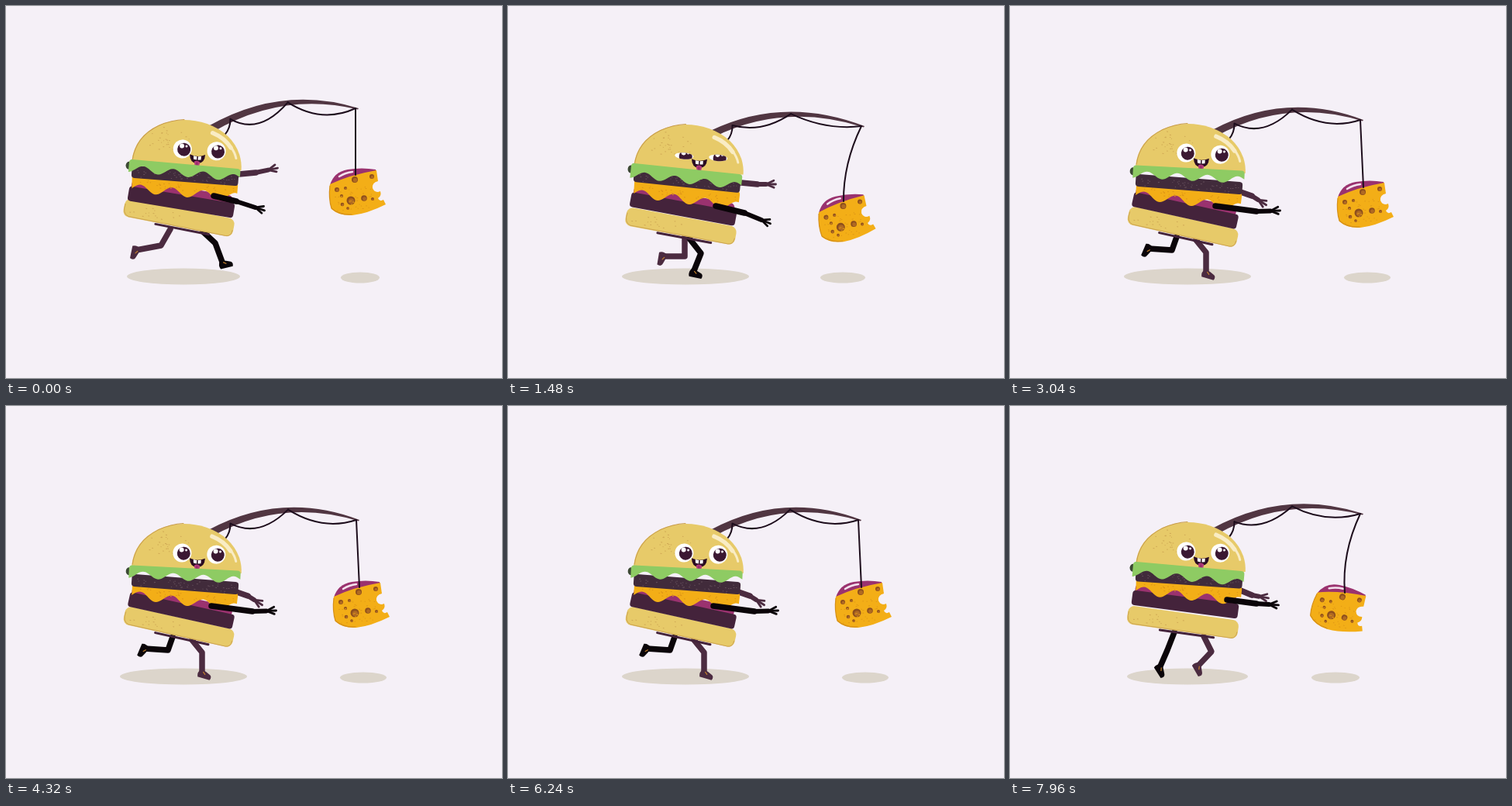
An HTML page with a canvas for the animation above (8 s loop, 640x480 px).

```html
<!DOCTYPE html>
<html lang="en">
<head>
<meta charset="utf-8">
<title>Running burger</title>
<style>
html, body { margin: 0; width: 100%; height: 100%; overflow: hidden; background: #f5f0f7; }
canvas { display: block; width: 640px; height: 480px; }
</style>
</head>
<body>
<canvas id="stage" width="640" height="480"></canvas>
<script>
const ctx = document.getElementById('stage').getContext('2d');
const LOOP = 8000, RUN = 640, STEP = 320, TICK = 40;
const BUN = '#e7ca69', PLUM = '#44233b', LIMB = '#4b2b40', BLACK = '#0b0509',
      TAN = '#c89c4c', LINE = '#1d0d1c', BERRY = '#9a326f', GOLD = '#f3ae17';

// time, then bun y/angle, lettuce y/angle/depth, patty, sauce, lower patty, base bun, shadow
const bodyKeys = [
  [0,   204, 5,   204, 5, 12,  219, 4.5, 231, 5,  253, 9.5,  273, 11,   73],
  [160, 209, 4,   209, 3, 12,  230, 4.5, 242, 7,  264, 12.5, 285, 12.5, 82],
  [200, 210, 4.5, 210, 6, 15,  226, 6,   240, 7,  262, 10.5, 284, 10.5, 82],
  [280, 207, 4,   207, 5, 15,  223, 4,   235, 6,  256, 7.5,  279, 8,    78]
];
// time, hip, knee, ankle, toe offset
const legKeys = [
  [0,   254, 291, 270, 306, 280, 333, 11, -2],
  [80,  250, 297, 265, 313, 269, 340, 11, 3],
  [160, 240, 302, 253, 318, 253, 345, 11, 4],
  [200, 234, 300, 249, 319, 239, 344, 11, 3],
  [280, 212, 292, 203, 315, 193, 338, 5, 9],
  [320, 212, 288, 200, 309, 168, 315, -3, 11],
  [480, 215, 298, 209, 315, 179, 313, -5, 10],
  [520, 228, 298, 228, 323, 200, 323, -3, 13],
  [600, 250, 297, 260, 317, 242, 336, 5, 10]
];
// time, shoulder, elbow, fingertips
const nearArmKeys = [
  [0,   268, 245, 297, 252, 334, 264],
  [200, 268, 258, 305, 267, 339, 281],
  [280, 280, 250, 318, 255, 347, 257],
  [340, 278, 240, 318, 247, 350, 250],
  [480, 265, 258, 318, 265, 349, 264]
];
const farArmKeys = [
  [0,   290, 218, 322, 215, 351, 209],
  [120, 290, 225, 322, 223, 350, 221],
  [200, 290, 227, 322, 230, 346, 230],
  [280, 288, 234, 312, 244, 334, 248],
  [340, 286, 228, 310, 236, 333, 240],
  [480, 286, 236, 312, 245, 331, 257]
];
// time, tip x/y, bend y, string sag
const rodKeys = [
  [0,   454, 132, 104, 16],
  [60,  454, 131, 103, 15],
  [200, 459, 155, 118, 9],
  [280, 455, 139, 109, 12],
  [370, 453, 116, 83, 16],
  [480, 455, 147, 112, 14],
  [560, 456, 148, 114, 12]
];
// time, x, y, angle, string bow, shadow x/radius
const baitKeys = [
  [0,   451, 218, 0,  0,   457, 25],
  [100, 446, 234, -4, -5,  448, 27],
  [200, 433, 252, -4, -12, 432, 29],
  [280, 432, 241, 21, -14, 420, 31],
  [380, 459, 212, -7, 4,   446, 28],
  [420, 463, 215, -7, 4,   457, 28],
  [480, 456, 234, 0,  0,   461, 30],
  [560, 450, 238, 2,  0,   459, 29]
];

// Smooth periodic curve through the keys
function pose(keys, time, period) {
  const t = time % period, n = keys.length;
  const at = i => {
    const turn = Math.floor(i / n), k = keys[i - turn * n];
    return { t: k[0] + turn * period, v: k };
  };
  let i = n - 1;
  while (keys[i][0] > t) i--;
  const [a, b, c, d] = [at(i - 1), at(i), at(i + 1), at(i + 2)];
  const span = c.t - b.t, u = (t - b.t) / span, w = 1 - u;
  return b.v.slice(1).map((_, j) => {
    const k = j + 1;
    const m0 = (c.v[k] - a.v[k]) / (c.t - a.t) * span;
    const m1 = (d.v[k] - b.v[k]) / (d.t - b.t) * span;
    return w * w * (1 + 2 * u) * b.v[k] + u * w * w * m0 +
           u * u * (3 - 2 * u) * c.v[k] - u * u * w * m1;
  });
}

function place(x, y, degrees, draw) {
  ctx.save();
  ctx.translate(x, y);
  ctx.rotate(degrees * Math.PI / 180);
  draw();
  ctx.restore();
}
function fill(path, color) {
  ctx.fillStyle = color;
  ctx.fill(new Path2D(path));
}
function stroke(path, color, width) {
  ctx.strokeStyle = color;
  ctx.lineWidth = width;
  ctx.lineCap = ctx.lineJoin = 'round';
  ctx.stroke(new Path2D(path));
}
function oval(x, y, rx, ry, color) {
  ctx.fillStyle = color;
  ctx.beginPath();
  ctx.ellipse(x, y, rx, ry, 0, 0, 7);
  ctx.fill();
}
function slab(halfWidth, halfHeight, radius, color) {
  ctx.fillStyle = color;
  ctx.beginPath();
  ctx.roundRect(-halfWidth, -halfHeight, halfWidth * 2, halfHeight * 2, radius);
  ctx.fill();
}
const noise = n => { const s = Math.sin(n * 127.1) * 43758.5; return s - Math.floor(s); };
function speckle(count, x, y, w, h, color, seed) {
  ctx.fillStyle = color;
  for (let i = 0; i < count; i++) {
    const n = seed + i * 3;
    ctx.fillRect(x + noise(n) * w, y + noise(n + 1) * h, 1 + noise(n + 2), 1);
  }
}
// Slab whose lower edge hangs in lobes
function drip(left, right, top, depth, swing, period, lobe, color) {
  ctx.fillStyle = color;
  ctx.beginPath();
  ctx.moveTo(left, top + 4);
  ctx.quadraticCurveTo(left, top, left + 4, top);
  ctx.lineTo(right - 4, top);
  ctx.quadraticCurveTo(right, top, right, top + 4);
  for (let x = right; x >= left; x -= 2)
    ctx.lineTo(x, depth + swing * Math.cos((x - lobe) / period * 2 * Math.PI));
  ctx.fill();
}

function leg(time, color) {
  const [hx, hy, kx, ky, ax, ay, tx, ty] = pose(legKeys, time, RUN);
  stroke(`M${hx} ${hy}L${kx} ${ky}L${ax} ${ay}`, color, 7.5);
  const angle = Math.atan2(ty, tx) * 180 / Math.PI;
  place(ax, ay, angle, () => {
    fill('M-3 -5Q4 -4 9 -2Q14 -1 12 5L-4 6Q-7 1 -3 -5Z', color);
    stroke('M1 -2L4 0', '#c4812b', 1.2);
  });
}

function arm(keys, time, color) {
  const [sx, sy, ex, ey, hx, hy] = pose(keys, time, RUN);
  const a = Math.atan2(hy - ey, hx - ex);
  const wx = hx - 13 * Math.cos(a), wy = hy - 13 * Math.sin(a);
  stroke(`M${sx} ${sy}L${ex} ${ey}`, color, 7.5);
  stroke(`M${ex} ${ey}L${wx} ${wy}`, color, 6);
  for (const spread of [-0.45, 0, 0.4]) {
    const r = spread ? 11 : 12.5;
    stroke(`M${wx} ${wy}L${wx + r * Math.cos(a + spread)} ${wy + r * Math.sin(a + spread)}`, color, 2.8);
  }
}

function rod(time, bunY) {
  const [tx, ty, bend, sag] = pose(rodKeys, time, RUN);
  const bx = 266, by = bunY - 48, cx = 356;
  const on = u => [
    (1 - u) ** 2 * bx + 2 * u * (1 - u) * cx + u * u * tx,
    (1 - u) ** 2 * by + 2 * u * (1 - u) * bend + u * u * ty
  ];
  const [ax, ay] = on(0.13), [mx, my] = on(0.53), sx = tx - 3;
  const hang = (x0, y0, x1, y1, s) =>
    stroke(`M${x0} ${y0}Q${(x0 + x1) / 2} ${(y0 + y1) / 2 + 2 * s} ${x1} ${y1}`, LINE, 2);
  fill(`M${bx - 5} ${by - 1}Q${cx} ${bend - 3} ${tx + 1} ${ty}` +
       `L${tx} ${ty + 1.5}Q${cx} ${bend + 6} ${bx} ${by + 7}Z`, '#513642');
  stroke(`M${ax} ${ay + 2}Q${ax} ${ay + 14} ${ax - 7} ${ay + 22}`, LINE, 2);
  hang(ax, ay + 2, mx, my + 1, sag);
  hang(mx, my + 1, sx, ty, sag * 0.75);
  return [sx, ty];
}

function bait([x, y, angle, bow], [sx, sy]) {
  place(x, y, angle, () => {
    fill('M-33 13Q-28 -4 -10 -7Q8 -10 26 -7L27 -3L-20 16Z', BERRY);
    stroke('M-21 2Q-13 -3 -4 -4', '#f4e3ee', 2.5);
    fill('M-33 12Q-8 0 27 -6L29 8Q21 10 22 17Q25 24 32 21Q34 27 29 30' +
         'Q31 35 36 32L39 38Q15 50 -4 52Q-21 53 -31 44Q-35 30 -33 12Z', GOLD);
    stroke('M-33 14Q-35 30 -31 43Q-21 52 -5 51', '#d58f18', 1.2);
    const holes = [[-1, 6, 4], [21, 2, 3], [-24, 19, 3], [-6, 33, 5.5], [11, 30, 3.8],
                   [-18, 27, 2], [-17, 38, 2.3], [-10, 43, 1.8], [22, 31, 2], [-13, 17, 2]];
    for (const [hx, hy, r] of holes) {
      oval(hx, hy, r, r, '#8d4f1d');
      oval(hx + 0.5, hy + 0.7, r * 0.65, r * 0.65, '#b06a23');
    }
    speckle(40, -28, 14, 48, 32, '#dd9617', 90);
  });
  stroke(`M${sx} ${sy}Q${(sx + x) / 2 + bow} ${(sy + y) / 2} ${x} ${y}`, LINE, 2);
}

function eye(x, y, blink) {
  ctx.save();
  ctx.translate(x, y + blink * 3);
  ctx.beginPath();
  ctx.ellipse(0, 0, 12, 12 * (1 - 0.65 * blink), 0, 0, 7);
  ctx.clip();
  oval(0, 0, 13, 13, '#fff');
  oval(2, 0.5, 8.5, 8.5, '#3b1832');
  oval(-1, -4, 3, 3, '#fff');
  oval(5, -4, 1.5, 1.5, '#fff');
  ctx.restore();
}

function face(blink) {
  eye(-7, -19, blink);
  eye(37, -20, blink);
  fill('M3 -13Q13 -9 23 -14Q23 -2 13 -2Q4 -2 3 -13Z', '#2a0c22');
  fill('M8 -11.5L12.5 -11L12.5 -6.5L8.5 -7ZM14 -11L18 -11.5L18 -7L14 -6.5Z', '#fff');
  fill('M9.5 -4Q13 -7 17 -4L16 3Q13 6 11 2Z', '#b0377b');
  stroke('M13 -3L13.5 1', '#6e1c50', 0.8);
}

function topBun(blink) {
  const dome = 'M-71 3Q-70 -30 -40 -47Q-12 -62 22 -54Q55 -45 67 -18Q71 -8 71 2Q0 10 -71 3Z';
  fill(dome, BUN);
  stroke('M-70 0Q-68 -30 -40 -46.5Q-24 -55 -8 -57', TAN, 1);
  speckle(30, -50, -46, 50, 32, '#cfa855', 7);
  stroke('M30 -43Q46 -38 55 -26', '#f9ecc4', 5.5);
  stroke('M55 -27Q61 -20 63 -13', '#f9ecc4', 3);
  face(blink);
}

function draw(time) {
  const t = Math.floor(time % LOOP / TICK) * TICK;
  const [bunY, bunA, leafY, leafA, leafDepth, pattyY, pattyA, sauceY, sauceA,
         lowY, lowA, baseY, baseA, shade] = pose(bodyKeys, t, STEP);
  const cheese = pose(baitKeys, t, RUN);
  const blink = Math.max(0, 1 - Math.abs(t % RUN - 200) / 70);

  ctx.fillStyle = '#f5f0f7';
  ctx.fillRect(0, 0, 640, 480);
  oval(229, 349, shade, 10.5, '#dcd5cb');
  oval(cheese[4], 350.5, cheese[5], 7, '#dcd5cb');

  const tip = rod(t, bunY);
  bait(cheese, tip);
  leg(t + STEP, LIMB);
  leg(t, BLACK);
  arm(farArmKeys, t, LIMB);

  place(223, baseY, baseA, () => {
    stroke('M-28 14L42 14', PLUM, 3);
    slab(72, 12, 8, BUN);
    stroke('M-71 -4Q-73 9 -64 11L64 11.5Q71 11 71 3', TAN, 0.8);
    speckle(16, -64, -8, 70, 16, '#cfa855', 31);
  });
  place(227, lowY - 11, lowA, () => slab(66, 8, 6, BERRY));
  place(226, lowY, lowA, () => slab(69, 9.5, 4, PLUM));
  place(230, sauceY, sauceA, () => {
    drip(-68, 69, -9, 10, 5.5, 41, -36, GOLD);
    speckle(36, -62, -2, 126, 9, '#dc9417', 55);
  });
  place(231, pattyY, pattyA, () => {
    slab(69, 8, 4, '#412b3b');
    speckle(45, -64, -5, 128, 12, '#66505c', 12);
  });
  place(233, bunY, bunA, () => topBun(blink));
  place(231, leafY, leafA, () => {
    oval(-72, 8, 4, 5, '#3c4934');
    drip(-72, 72, 0, leafDepth, 4.5, 39, -34, '#8ecb63');
  });
  arm(nearArmKeys, t, BLACK);
}

const start = performance.now();
function frame() {
  draw(performance.now() - start);
  requestAnimationFrame(frame);
}
frame();
</script>
</body>
</html>
```
